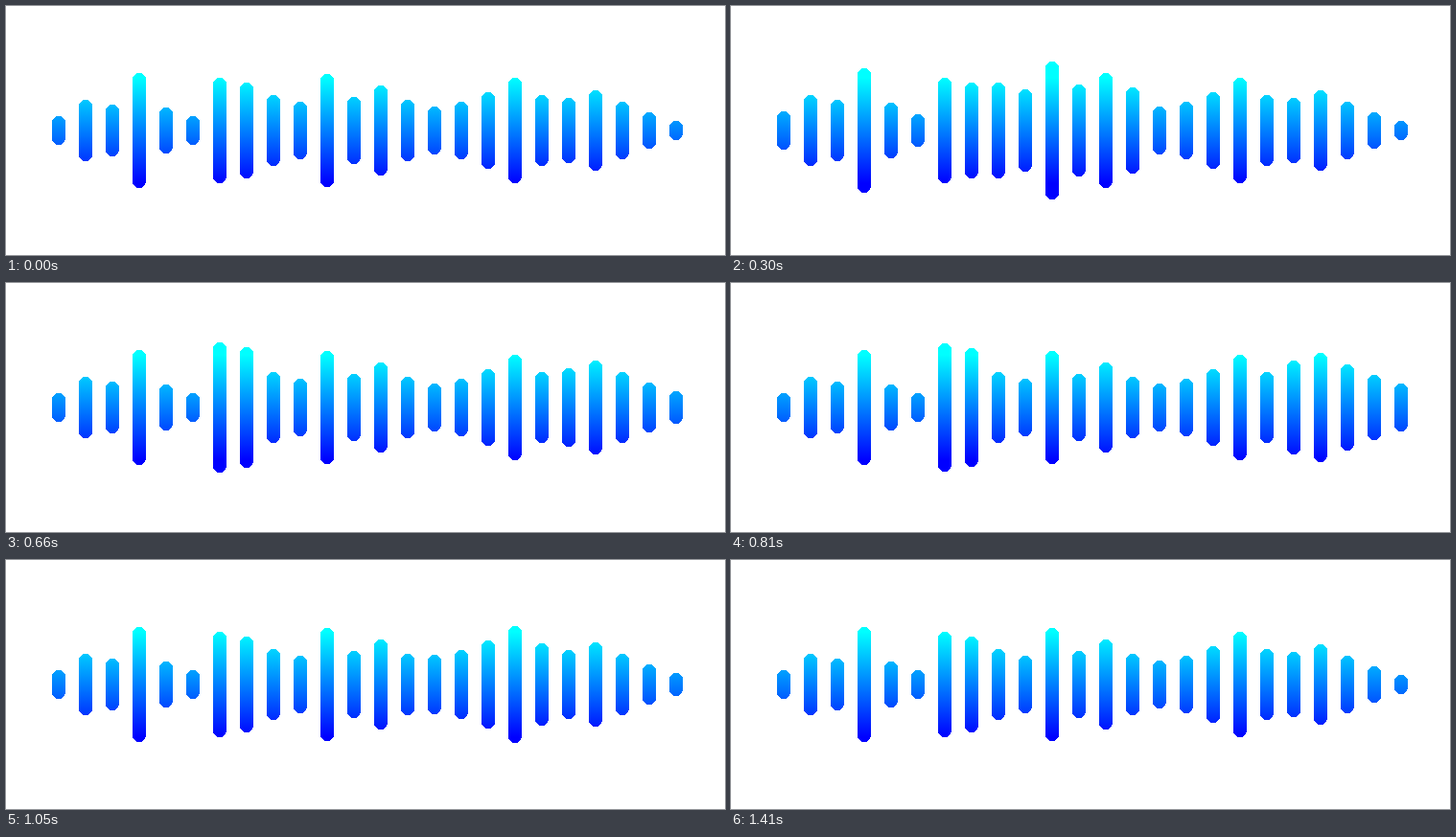
An HTML page that plays this animation: 750x260 px, repeating every 1.44 s.

```html
<!DOCTYPE html>
<html lang="en">
<head>
<meta charset="utf-8">
<title>Sound wave</title>
<style>
  html, body { margin: 0; width: 100%; height: 100%; overflow: hidden; background: #fff; }
  svg { display: block; width: 100%; height: 100%; }
</style>
</head>
<body>
<svg id="wave" viewBox="0 0 750 260" shape-rendering="crispEdges">
  <defs>
    <linearGradient id="tint" gradientUnits="userSpaceOnUse" x1="0" y1="75" x2="0" y2="185">
      <stop offset="0" stop-color="#0ff"/>
      <stop offset="1" stop-color="#00f"/>
    </linearGradient>
  </defs>
  <g id="bars" fill="url(#tint)"></g>
</svg>
<script>
const LOOP = 1440, STEP = 30;
const MID = 130, LEFT = 48, PITCH = 28, WIDTH = 14;

// Half heights at rest
const rest = [15, 32, 27, 60, 24, 15, 55, 50, 37, 30, 59, 35,
              47, 32, 25, 30, 40, 55, 37, 34, 42, 30, 19, 10];

// Each group of bars swells once per loop; times in ms
const pulses = [
  { from: 0,  to: 4,  start: 0,   peak: 180,  end: 360,  grow: 15 },
  { from: 5,  to: 5,  start: 0,   peak: 180,  end: 360,  grow: 5 },
  { from: 6,  to: 7,  start: 540, peak: 720,  end: 945,  grow: 20 },
  { from: 8,  to: 13, start: 0,   peak: 270,  end: 540,  grow: 15 },
  { from: 14, to: 18, start: 970, peak: 1170, end: 1395, grow: 15 },
  { from: 19, to: 23, start: 540, peak: 810,  end: 1080, grow: 15 }
];

const group = document.getElementById('bars');
const bars = rest.map((half, i) => {
  const bar = document.createElementNS('http://www.w3.org/2000/svg', 'rect');
  bar.setAttribute('x', LEFT + i * PITCH);
  bar.setAttribute('width', WIDTH);
  bar.setAttribute('rx', WIDTH / 2);
  group.appendChild(bar);
  return bar;
});

function swell(p, t) {
  const up = (t - p.start) / (p.peak - p.start);
  const down = (p.end - t) / (p.end - p.peak);
  return Math.round(p.grow * Math.max(0, Math.min(up, down)));
}

function draw(time) {
  const t = Math.floor((time % LOOP) / STEP) * STEP;
  for (const p of pulses) {
    const extra = swell(p, t);
    for (let i = p.from; i <= p.to; i++) {
      const half = rest[i] + extra;
      bars[i].setAttribute('y', MID - half);
      bars[i].setAttribute('height', 2 * half);
    }
  }
}

const begin = performance.now();
function tick() {
  draw(performance.now() - begin);
  requestAnimationFrame(tick);
}
draw(0);
requestAnimationFrame(tick);
</script>
</body>
</html>
```
